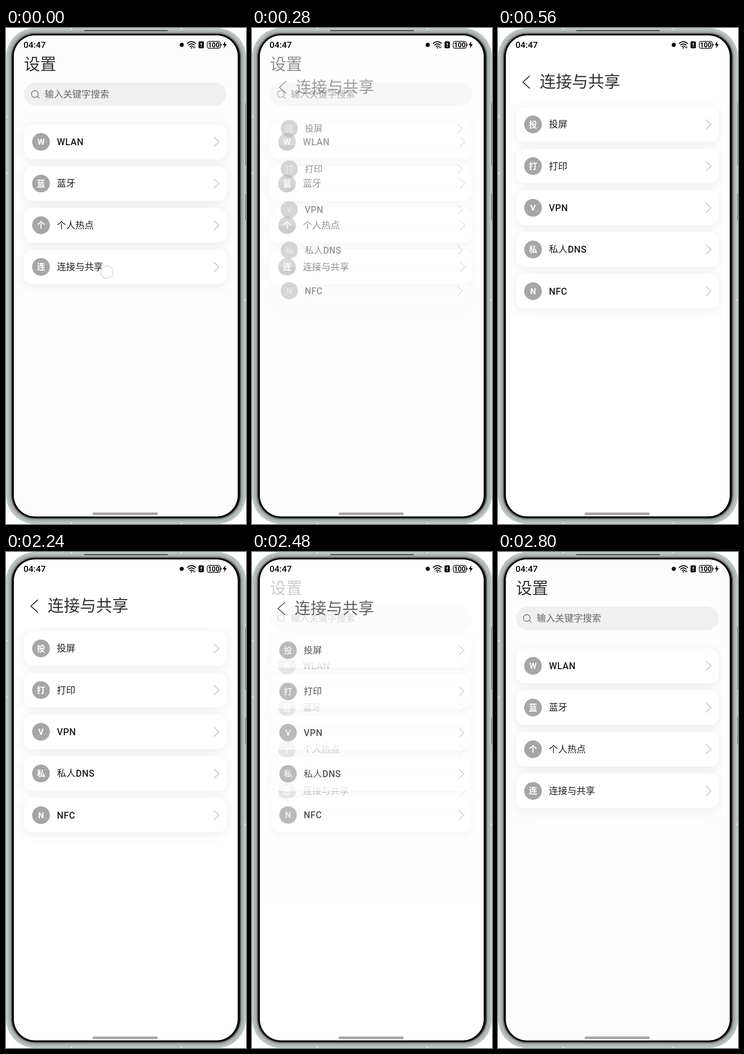
Recreate the animation shown at these times as an HTML page. Size 521 px wide and 1075 px high, loop 2.88 s.

```html
<!DOCTYPE html>
<html lang="zh">
<head>
<meta charset="utf-8">
<title>设置</title>
<style>
  html, body { margin: 0; width: 100%; height: 100%; overflow: hidden; background: #fff; }
  svg { display: block; width: 521px; height: 1075px; }
  text { font-family: Roboto, "Noto Sans CJK SC", "Noto Sans CJK", sans-serif; }
  .title { font-size: 35px; fill: #303030; }
  .label { font-size: 20px; font-weight: 500; fill: #1c1c1c; }
  .latin { letter-spacing: .5px; }
  .badge { font-size: 18px; font-weight: 700; fill: #fff; text-anchor: middle; }
  .line { fill: none; stroke-linecap: round; stroke-linejoin: round; }
</style>
</head>
<body>
<svg viewBox="0 0 521 1075" xmlns="http://www.w3.org/2000/svg">
  <defs>
    <filter id="blur" x="-15%" y="-60%" width="130%" height="220%"><feGaussianBlur stdDeviation="11"/></filter>
    <clipPath id="screen"><rect x="17" y="16" width="486" height="1042.500" rx="46"/></clipPath>
    <clipPath id="mainList"><rect x="17" y="193" width="486" height="860"/></clipPath>
    <clipPath id="subList"><rect x="17" y="156" width="486" height="900"/></clipPath>
  </defs>

  <g id="frame"></g>
  <rect x="17" y="16" width="486" height="1042.500" rx="46" fill="#fff"/>

  <g clip-path="url(#screen)">
    <g id="main">
      <rect x="17" y="16" width="486" height="1043" fill="#fdfdfd"/>
      <text class="title" x="39" y="91">设置</text>
      <rect x="39" y="118" width="440" height="51" rx="25.500" fill="#f0f0f0"/>
      <g class="line" stroke="#666" stroke-width="1.400">
        <circle cx="62.500" cy="143" r="7.300"/>
        <path d="M68 148.500L72 152.300"/>
      </g>
      <text x="84" y="151" font-size="20" fill="#666">输入关键字搜索</text>
      <g id="mainRows" clip-path="url(#mainList)"></g>
    </g>
    <g id="sub">
      <path class="line leaf" d="M68.500 104L54 117.300L68.500 130.500" stroke="#303030" stroke-width="2"/>
      <text class="title leaf" x="90.500" y="129.300">连接与共享</text>
      <g id="subRows" clip-path="url(#subList)"></g>
    </g>
    <circle id="touch" cx="219" cy="529" r="13.500" fill="#fff" fill-opacity=".45" stroke="#dcdcdc" stroke-width="2"/>
  </g>

  <g id="status">
    <text x="38" y="42.800" font-size="19" font-weight="500">04:47</text>
    <circle cx="381.500" cy="36.500" r="4.500"/>
    <g class="line" stroke="#000" stroke-width="2">
      <path d="M393.500 33.500Q402.500 25.500 411.500 33.500M396.500 37Q402.500 31.800 408.500 37M399.500 40.300Q402.500 37.800 405.500 40.300"/>
    </g>
    <circle cx="402.500" cy="43" r="1.500"/>
    <path d="M407.300 44v-4M410 40v4" stroke="#000" stroke-width="1.300"/>
    <rect x="418" y="29" width="11.500" height="15" rx="2.500"/>
    <path d="M423.800 32v5.500M423.800 39.300v2" stroke="#fff" stroke-width="2"/>
    <rect x="436.700" y="29" width="28.600" height="15" rx="4.500" fill="none" stroke="#000" stroke-width="1.400"/>
    <path d="M467.200 34.500v4" stroke="#000" stroke-width="1.600"/>
    <text x="451" y="41.600" font-size="14.500" font-weight="700" text-anchor="middle">100</text>
    <path d="M476.300 28.500L470.500 37.300H474.300L473 44.300L479.300 34.800H475.300Z"/>
  </g>
  <rect x="188" y="1050" width="141.500" height="6" rx="3" fill="#a9a9a9"/>
</svg>

<script>
const LOOP = 2880, STEP = 40;
const $ = id => document.getElementById(id);

// Phone body: nested rounded outlines, from the metal rim to the black bezel.
function drawFrame() {
  const layers = [
    [0.5, "#9cb4ad"], [2, "#cbd9d5"], [4, "#7f958e"], [5, "#c3cdca"], [7, "#8d9291"],
    [8, "#b0b2b2"], [9.5, "#929292"], [11, "#6c6c6c"], [12.3, "#3a3a3a"], [13.5, "#000"]
  ];
  const body = layers.map(([i, fill]) =>
    `<rect x="${i}" y="${i}" width="${521 - 2 * i}" height="${1075 - 2 * i}" rx="${63 - i}" fill="${fill}"/>`);
  const mark = (x, y, w, h, fill) => `<rect x="${x}" y="${y}" width="${w}" height="${h}" fill="${fill}"/>`;
  const bands = [
    mark(0, 190, 4, 4, "#dbe5e2"), mark(0, 313, 4, 4, "#dbe5e2"), mark(517, 588, 4, 4, "#dbe5e2"),
    ...[140, 379].flatMap(x => [mark(x, 0, 4, 4, "#dbe5e2"), mark(x, 1071, 4, 4, "#dbe5e2")]),
    mark(519.5, 163, 1.5, 135, "#6f817b"), mark(519.5, 359, 1.5, 58, "#6f817b"),
    mark(170, 4.5, 181, 2, "#3c3f3e")
  ];
  $("frame").innerHTML = body.concat(bands).join("");
}

function row(label, i, top) {
  const y = top + i * 90.35, cy = y + 37.8;
  const latin = /[A-Z]/.test(label) ? " latin" : "";
  return `<g class="card">
      <rect x="39" y="${y + 4}" width="440" height="75.5" rx="20" fill-opacity=".075" filter="url(#blur)"/>
      <rect x="39" y="${y}" width="440" height="75.5" rx="19" fill="#fff"/>
    </g>
    <circle class="leaf" cx="76" cy="${cy}" r="19.2" fill="#a6a6a6"/>
    <text class="badge leaf" x="76" y="${cy + 6.6}">${label[0]}</text>
    <text class="label leaf${latin}" x="110.5" y="${cy + 7.3}">${label}</text>
    <path class="line leaf" d="M452 ${cy - 9.8}l10.3 9.8l-10.3 9.8" stroke="#c9c9c9" stroke-width="2"/>`;
}

const fillRows = (id, top, labels) => {
  $(id).innerHTML = labels.map((label, i) => row(label, i, top)).join("");
};

drawFrame();
fillRows("mainRows", 209, ["WLAN", "蓝牙", "个人热点", "连接与共享"]);
fillRows("subRows", 171.2, ["投屏", "打印", "VPN", "私人DNS", "NFC"]);

const main = $("main"), sub = $("sub"), touch = $("touch");
const leaves = sub.querySelectorAll(".leaf"), cards = sub.querySelectorAll(".card");

function ease(t, start, length) {
  const k = Math.min(1, Math.max(0, (t - start) / length));
  return (1 - Math.cos(Math.PI * k)) / 2;
}

// 0 = main page, 1 = sub page
function progress(t) {
  if (t >= 2800) return 0;
  return ease(t, 30, 530) - ease(t, 2312, 510);
}

function draw(time) {
  const t = Math.floor((time % LOOP) / STEP) * STEP;
  const p = progress(t), scale = 0.95 + 0.05 * p;
  main.setAttribute("opacity", 1 - p);
  sub.setAttribute("transform", `translate(259 536) scale(${scale}) translate(-259 -536)`);
  sub.style.display = p > 0 ? "" : "none";
  leaves.forEach(el => el.setAttribute("opacity", p));
  cards.forEach(el => el.setAttribute("opacity", p * p));
  touch.style.display = t < STEP ? "" : "none";
}

const begin = performance.now();
function tick() {
  draw(performance.now() - begin);
  requestAnimationFrame(tick);
}
tick();
</script>
</body>
</html>
```
